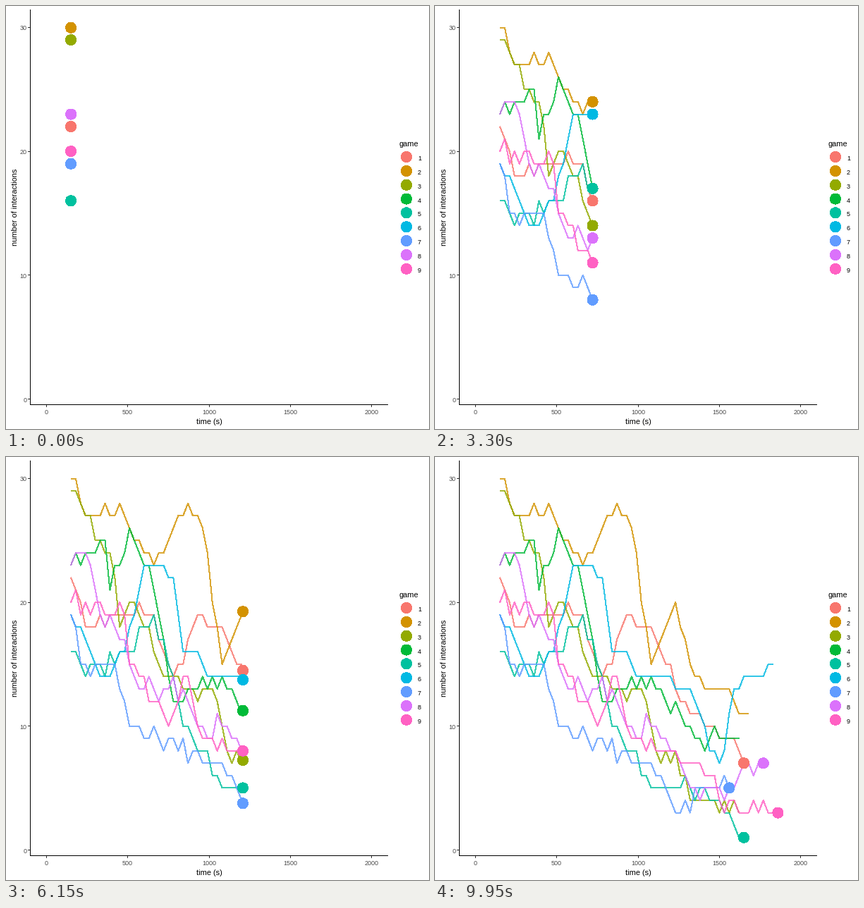
Recreate the animation shown at these times as a matplotlib script. Size 600x600 px, loop 10000 ms.

```python
import numpy as np
import matplotlib.pyplot as plt
from matplotlib.animation import FuncAnimation
from matplotlib.patches import Circle, Rectangle

SIZE, DPI = 600, 100
FRAMES, INTERVAL = 200, 50
PX = 72 / DPI                      # points per pixel
T0, STEP, T_END = 150, 30, 1860    # seconds
LEFT, RIGHT, TOP, BOTTOM = 34.4, 541.8, 5.2, 565.1
RADIUS = 7.5
WOBBLE = 0.7                       # spread of the counts around their trend

rng = np.random.default_rng(4)
plt.rcParams["font.family"] = "Liberation Sans"
plt.rcParams["path.simplify"] = False


def px(t):
    return LEFT + (np.asarray(t) + 100) * (RIGHT - LEFT) / 2200


def py(v):
    return BOTTOM - (np.asarray(v) + 0.45) * (BOTTOM - TOP) / 31.9


fig = plt.figure(figsize=(SIZE / DPI, SIZE / DPI), dpi=DPI, facecolor="white")
ax = fig.add_axes([0, 0, 1, 1])
ax.set_xlim(0, SIZE)
ax.set_ylim(SIZE, 0)
ax.axis("off")


def bar(x, y, w, h, color="black"):
    ax.add_patch(Rectangle((x, y), w, h, facecolor=color, edgecolor="none",
                           snap=False, zorder=1))


def label(x, y, text, size, color="black", ha="left", **kw):
    ax.text(x, y, text, fontsize=size * PX, color=color, ha=ha,
            va="baseline", **kw)


def dot(x, y, color, z):
    circle = Circle((x, y), RADIUS, facecolor=color, edgecolor="none",
                    antialiased=False, zorder=z)
    return ax.add_patch(circle)


def counts(points):
    """Whole counts that wobble about a trend and meet it at its key points."""
    at, level = np.array(points).T
    steps = np.arange(at[-1] + 1)
    noise = rng.uniform(-WOBBLE, WOBBLE, len(steps))
    noise[at] = 0
    return np.round(np.interp(steps, at, level) + noise)


class Game:
    """One trace with its leading dot; the dot may stay after the last value."""

    def __init__(self, number, color, stays, points):
        self.values = counts(points)
        steps = np.arange(len(self.values))
        self.stays = stays
        self.times = T0 + STEP * steps
        # Each value lands on the nearest whole frame.
        self.keys = np.round(steps * STEP * (FRAMES - 1) / (T_END - T0))
        # Without antialiasing a 1 px stroke covers about two pixels.
        self.line, = ax.plot([], [], color=color, alpha=0.8, lw=PX,
                             antialiased=False, snap=False,
                             solid_capstyle="butt", solid_joinstyle="round",
                             zorder=2 + number / 100)
        self.dot = dot(0, 0, color, 3 + number / 100)
        y = 214 + 19.85 * (number - 1)
        dot(568, y, color, 3)
        label(584, y + 5, str(number), 9)

    def show(self, frame):
        past = self.keys <= frame
        t = np.interp(frame, self.keys, self.times)
        v = np.interp(frame, self.keys, self.values)
        self.line.set_data(px(np.append(self.times[past], t)),
                           py(np.append(self.values[past], v)))
        self.dot.center = (px(t), py(v))
        self.dot.set_visible(self.stays or frame <= self.keys[-1])


# Axes
bar(34, 5, 1, 561)
bar(34, 565, 508, 1)
for v in range(0, 31, 10):
    y = np.floor(py(v))
    bar(31, y, 3, 1, "#333333")
    label(29.5, y + 4.5, str(v), 9, "#4D4D4D", "right")
for t in range(0, 2001, 500):
    x = np.floor(px(t))
    bar(x, 566, 1, 3, "#333333")
    label(x + 0.5, 579, str(t), 9, "#4D4D4D", "center")
label(288, 593, "time (s)", 11, ha="center")
label(16, 285.5, "number of interactions", 11, ha="center",
      rotation=90, rotation_mode="anchor")
label(558, 199, "game", 11)

games = []


def add(color, stays, *points):
    games.append(Game(len(games) + 1, color, stays, points))


# Key points of each trend: (step, count)
add("#F8766D", True, (0, 22), (3, 18), (16, 19), (21, 14), (26, 19),
    (32, 17), (37, 12), (47, 9), (50, 7))
add("#D39200", False, (0, 30), (3, 27), (11, 27), (17, 23), (24, 28),
    (27, 26), (31, 15), (36, 20), (40, 14), (51, 11))
add("#93AA00", False, (0, 29), (8, 24), (10, 18), (13, 20), (19, 14),
    (30, 12), (32, 8), (36, 8), (39, 4), (49, 3))
add("#00BA38", False, (0, 23), (7, 25), (8, 21), (12, 26), (17, 21),
    (21, 12), (31, 14), (41, 9), (49, 9))
add("#00C19F", True, (0, 16), (3, 14), (11, 16), (17, 19), (23, 10),
    (32, 5), (42, 5), (50, 1))
add("#00B9E3", False, (0, 19), (7, 14), (11, 16), (15, 23), (21, 22),
    (23, 16), (40, 12), (43, 8), (46, 8), (48, 13), (56, 15))
add("#619CFF", True, (0, 19), (2, 15), (9, 15), (12, 10), (25, 8),
    (33, 6), (36, 3), (42, 5), (47, 5))
add("#DB72FB", True, (0, 23), (3, 24), (6, 19), (8, 19), (14, 13),
    (23, 13), (27, 10), (32, 10), (41, 4), (54, 7))
add("#FF61C3", True, (0, 20), (11, 19), (12, 15), (20, 10), (24, 14),
    (27, 9), (43, 6), (45, 4), (57, 3))


def update(frame):
    for game in games:
        game.show(frame)
    return []


anim = FuncAnimation(fig, update, frames=FRAMES, interval=INTERVAL,
                     repeat=True, repeat_delay=0, blit=False)
plt.show()
```
